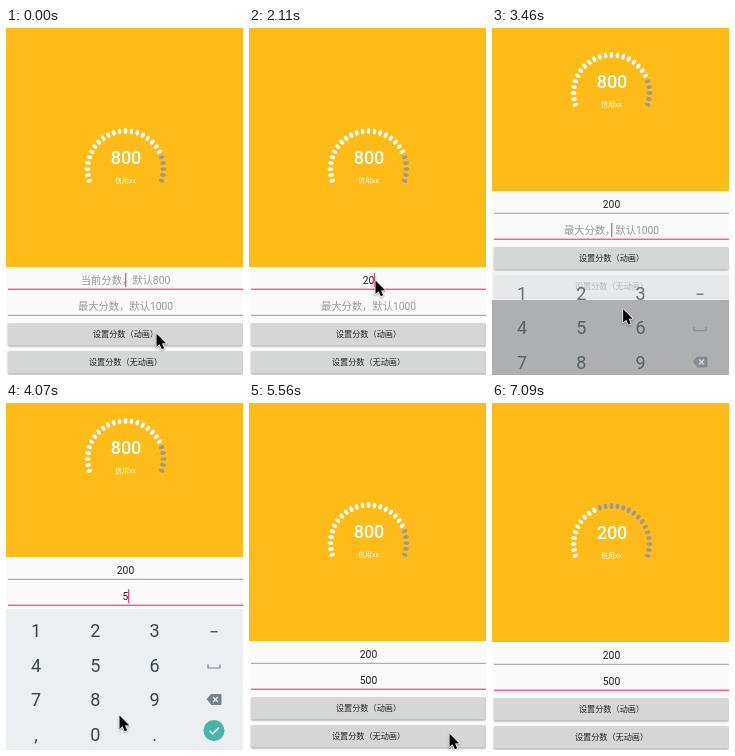
An HTML page with a canvas for the animation above (7240 ms loop, 237 by 347 pixels).

```html
<!DOCTYPE html>
<html lang="zh-CN">
<head>
<meta charset="utf-8">
<title>Score gauge</title>
<style>
html, body { margin: 0; width: 100%; height: 100%; overflow: hidden; background: #000; }
canvas { display: block; width: 237px; height: 347px; }
</style>
</head>
<body>
<canvas id="stage"></canvas>
<script>
const W = 237, H = 347, LOOP = 7240, MID = 119.5, PAN = 85;
const FONT = 'Roboto, "Noto Sans CJK SC", "Noto Sans CJK", sans-serif';
const INK = '#242424';

// Moments of the story, in ms
const CLICK1 = 480, CLICK2 = 6070, RUN = 800;
const FOCUS2 = 3080, OPEN = 3294, CLOSE = 5340, SLIDE = 250;
const KEYS1 = [1570, 2110, 2290], KEYS2 = [4020, 4430, 4590];

const canvas = document.getElementById('stage');
const ctx = canvas.getContext('2d');
const dpr = window.devicePixelRatio || 1;
canvas.width = Math.round(W * dpr);
canvas.height = Math.round(H * dpr);

const span = (t, start, length) => Math.min(1, Math.max(0, (t - start) / length));
const decelerate = p => 1 - (1 - p) * (1 - p);
const smooth = p => (1 - Math.cos(Math.PI * p)) / 2;

function text(str, x, y, size, color, weight = 400) {
  ctx.font = `${weight} ${size}px ${FONT}`;
  ctx.fillStyle = color;
  ctx.textAlign = 'center';
  ctx.fillText(str, x, y);
}

function rect(x, y, w, h, color) {
  ctx.fillStyle = color;
  ctx.fillRect(x, y, w, h);
}

function disc(x, y, r, color) {
  ctx.beginPath();
  ctx.arc(x, y, r, 0, 7);
  ctx.fillStyle = color;
  ctx.fill();
}

function line(color, width, ...points) {
  ctx.beginPath();
  points.forEach(([x, y]) => ctx.lineTo(x, y));
  ctx.strokeStyle = color;
  ctx.lineWidth = width;
  ctx.stroke();
}

// The gauge sweeps 216 degrees with a dot every 9
function drawGauge(t) {
  const second = t >= CLICK2 + 30;
  const start = (second ? CLICK2 : CLICK1) + 30;
  const p = t < CLICK1 + 30 ? 1 : smooth(span(t, start, RUN));
  const score = Math.floor((second ? 200 : 800) * p);
  const share = (second ? 0.4 : 0.8) * p;
  for (let i = 0; i < 25; i++) {
    const a = (162 + 9 * i) * Math.PI / 180;
    ctx.beginPath();
    ctx.ellipse(MID + 38 * Math.cos(a), 141 + 38 * Math.sin(a), 2.9, 1.8, a, 0, 7);
    ctx.fillStyle = share > 0 && i / 24 <= share ? '#fff' : '#9c9a96';
    ctx.fill();
  }
  text(score, 120, 136.3, 18, '#fff', 500);
  text('信用xx', MID, 155, 7, '#fff');
}

function drawField(t, y, final, hint, keys, since, focused) {
  const typed = keys.filter(k => t >= k);
  const value = final.slice(0, typed.length);
  text(value || hint, MID, y + 4, 10.3, value ? INK : '#9b9b9b');
  if (!focused) return rect(2, y + 8.8, W - 2, 1, '#9c9c9c');

  rect(2, y + 8.6, W - 2, 1.3, '#ff4a88');
  const reset = typed.length ? typed[typed.length - 1] : since;
  if ((t - reset) % 1000 < 500) {
    const half = value ? ctx.measureText(value).width / 2 : 0;
    rect(MID + half - 0.4, y - 7, 1.2, 14, '#ff4081');
  }
}

function drawButton(y, label, press = 0, x = 0) {
  const lift = Math.sin(Math.PI * press);
  ctx.save();
  ctx.beginPath();
  ctx.roundRect(2, y, W - 2.3, 22.3, 1.3);
  ctx.shadowColor = 'rgba(0,0,0,.35)';
  ctx.shadowBlur = (1.8 + 2 * lift) * dpr;
  ctx.shadowOffsetY = (0.9 + lift) * dpr;
  ctx.fillStyle = '#d5d6d6';
  ctx.fill();
  ctx.shadowColor = 'transparent';
  ctx.clip();
  if (press > 0) disc(x, y + 11, 12 + 160 * decelerate(press), `rgba(0,0,0,${0.13 * Math.min(1, 2 - 2 * press)})`);
  ctx.restore();
  text(label, MID, y + 13.5, 8.15, INK);
}

function drawForm(t) {
  const again = t >= CLICK2;
  const press = span(t, again ? CLICK2 : CLICK1, 620);
  drawField(t, 252, '200', '当前分数，默认800', KEYS1, -330, t < FOCUS2);
  drawField(t, 278, '500', '最大分数，默认1000', KEYS2, FOCUS2, t >= FOCUS2);
  drawButton(295.2, '设置分数（动画）', press, again ? 168 : 152);
  drawButton(323.2, '设置分数（无动画）');
}

const keyX = i => 30 + 59.3 * (i % 3);
const keyY = i => 228 + 34.4 * Math.floor(i / 3);

function drawKeyboard(t) {
  const shown = decelerate(span(t, OPEN + 46, SLIDE)) - span(t, CLOSE, 190) ** 1.5;
  if (shown <= 0) return;
  ctx.save();
  ctx.globalAlpha = shown;
  ctx.translate(0, 141 * (1 - shown));
  rect(0, 206, W, 141, '#eceff1');

  [...'123456789,0.'].forEach((key, i) => {
    const x = keyX(i), y = keyY(i);
    const held = KEYS2.some((k, n) => '500'[n] === key && t >= k - 40 && t < k + 40);
    if (held) rect(x - 28, y - 16, 56, 32, '#d6dbde');
    text(key, x, y + 6.4, 18, '#37474f');
  });

  // Minus, space, backspace and confirm share the last column
  const x = 208;
  rect(x - 3.5, 228, 7, 1.4, '#455a64');
  line('#78868d', 1.2, [x - 6, 261.5], [x - 6, 265], [x + 6, 265], [x + 6, 261.5]);
  line('#75838a', 1, [x - 7, 296.5], [x - 3, 291.5], [x + 7, 291.5], [x + 7, 301.5], [x - 3, 301.5]);
  ctx.fillStyle = '#75838a';
  ctx.fill();
  for (const s of [-1, 1]) line('#eceff1', 1.2, [x - 1, 296.5 - 2.5 * s], [x + 4, 296.5 + 2.5 * s]);
  disc(x, 327.5, 10.5, '#42b5ac');
  line('#fff', 1.5, [x - 4.5, 327.8], [x - 1.4, 330.9], [x + 5, 324.4]);
  ctx.restore();
}

// Each move: arrival, duration, place reached
const moves = [
  [190, 140, 152, 307],
  [1150, 500, 126, 252],
  [2960, 600, 132, 281],
  [3900, 500, 94, 266],
  [4070, 100, 113, 312],
  [4360, 290, 100, 330],
  [4940, 130, 182, 331],
  [5200, 110, 200, 330],
  [5980, 400, 168, 306],
  [6600, 350, 190, 352]
];

function drawPointer(t) {
  let px = 150, py = 305;
  for (const [end, length, x, y] of moves) {
    const p = smooth(span(t, end - length, length));
    px += (x - px) * p;
    py += (y - py) * p;
  }
  if (py > H) return;
  ctx.save();
  ctx.translate(px, py);
  ctx.lineJoin = 'round';
  ctx.shadowColor = 'rgba(0,0,0,.35)';
  ctx.shadowBlur = 2 * dpr;
  ctx.shadowOffsetY = dpr;
  line('#fff', 1.6, [0.5, 0.5], [0.5, 14], [3.6, 11.2], [5.8, 16.2], [8.2, 15.2], [6, 10.4], [10.2, 10.2], [0.5, 0.5]);
  ctx.shadowColor = 'transparent';
  ctx.fillStyle = '#000';
  ctx.fill();
  ctx.restore();
}

function draw(t) {
  ctx.setTransform(dpr, 0, 0, dpr, 0, 0);
  rect(0, 0, W, H, '#000');
  const pan = PAN * (decelerate(span(t, OPEN, SLIDE)) - decelerate(span(t, CLOSE, SLIDE)));
  ctx.save();
  ctx.translate(0, -Math.round(pan));
  rect(0, 0, W, 239, '#ffbb18');
  rect(0, 239, W, 109, '#fafafa');
  drawGauge(t);
  drawForm(t);
  ctx.restore();
  drawKeyboard(t);
  drawPointer(t);
}

const start = performance.now();
function tick(now) {
  draw(Math.max(0, now - start) % LOOP);
  requestAnimationFrame(tick);
}
draw(0);
requestAnimationFrame(tick);
</script>
</body>
</html>
```
